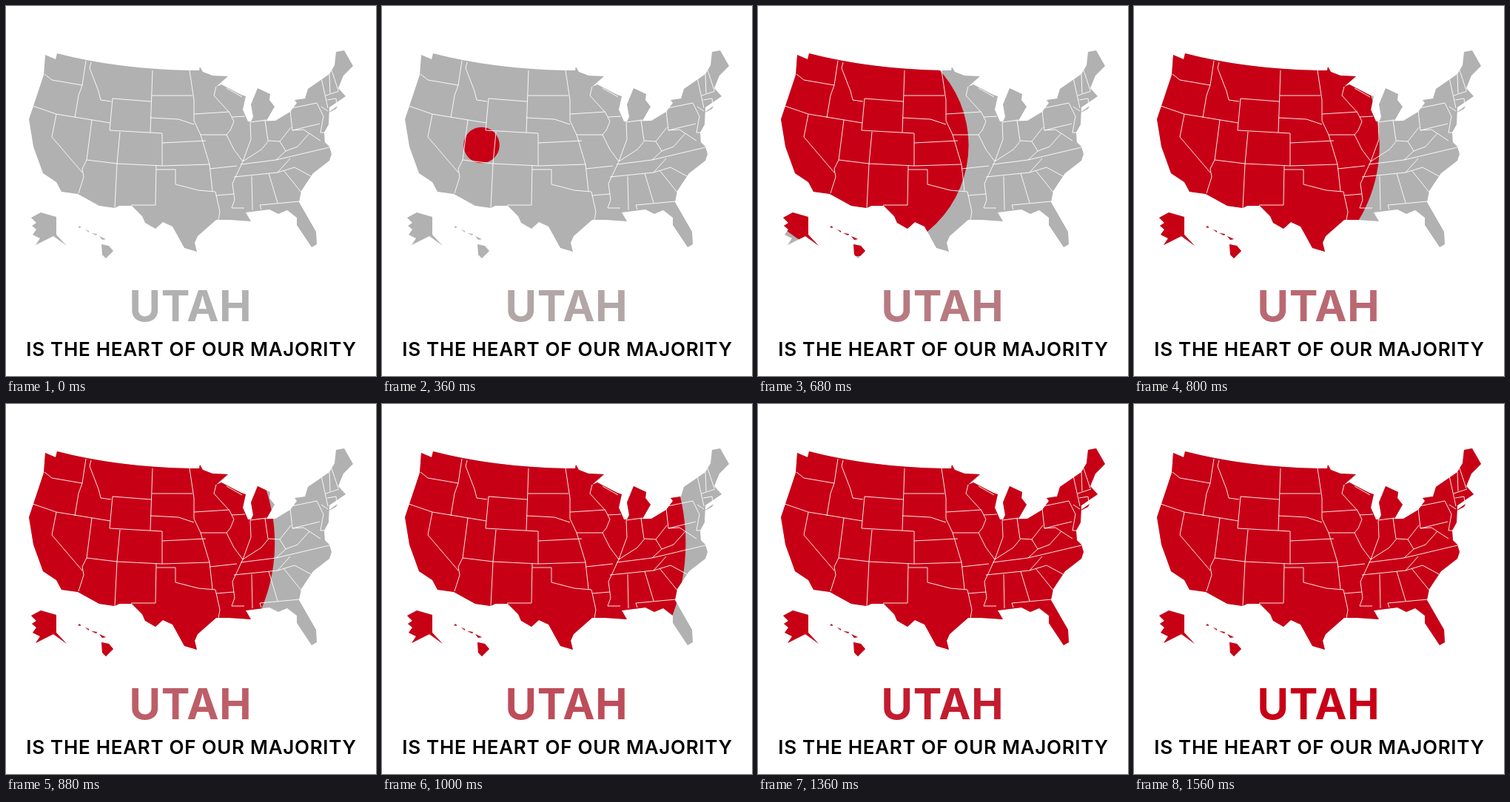
Animation, 500 px wide and 500 px high, one loop 2 s. Source, as an HTML page:

```html
<!DOCTYPE html>
<html lang="en">
<head>
<meta charset="utf-8">
<title>Utah is the heart of our majority</title>
<style>
  html, body { margin: 0; width: 100%; height: 100%; overflow: hidden; background: #fff; }
  svg { display: block; width: 100%; height: 100%; }
  text { font-family: Inter, "Open Sans", sans-serif; text-anchor: middle; }
  .state { font-size: 58px; font-weight: 700; letter-spacing: .8px; fill: #b1b1b1; animation: redden 2s infinite; }
  .tagline { font-size: 26px; font-weight: 600; letter-spacing: .7px; }
  .land { fill: #b1b1b1; }
  .wave { fill: #c80016; r: 0; animation: spread 2s infinite; }
  .borders { fill: none; stroke: #fff; stroke-width: .9; stroke-linejoin: round; }
  @keyframes spread {
    0% { r: 0; animation-timing-function: step-end; }
    16% { r: 8.6px; animation-timing-function: steps(22); }
    60%, 100% { r: 354.5px; }
  }
  @keyframes redden {
    0%, 14% { fill: #b1b1b1; animation-timing-function: steps(32); }
    78%, 100% { fill: #c80016; }
  }
</style>
</head>
<body>
<svg viewBox="0 0 500 500">
  <clipPath id="country">
    <!-- West -->
    <path d="M53 66L67 72 69 64Q150 85 248 87H261L262 82 266 89 279 94 300 95 284 109V289L259 311 255 320 258 332
      241 327 225 298 212 292 202 301 188 293 184 284 170 270H153L147 273 126 270 97 254 75 251 68 238 50 226
      37 190 31 153 51 93Z"/>
    <!-- Great Lakes to Chesapeake -->
    <path d="M284 109L291 106 318 120 324 122 320 140 327 156 364 155 384 143 393 131 390 127 404 125 408 112 437 92
      444 80 446 62 457 60 469 81 456 94 449 111 459 122 437 137 436 160 430 171 431 185 427 180 437 190 440 200
      270 215V120Z"/>
    <!-- South-east -->
    <path d="M270 190H437L440 200 437 209 415 226 399 250 396 265 419 305 420 322 413 326 393 296V286L380 276 368 281
      356 275 324 279 331 291 302 289H284L270 250Z"/>
    <!-- Lower Michigan, Long Island -->
    <path d="M331 156L334 150 331 133 340 111 357 119 356 127 363 136 352 155ZM434 145L448 135 446 139Z"/>
    <!-- Alaska -->
    <path d="M34 286L47 279 68 285V309L82 324 64 311 40 323 46 314 36 309 41 302 35 297 41 293Z"/>
    <!-- Hawaii -->
    <path d="M129 322L139 324 145 331 135 341 130 336ZM97 299l3-2 1 3zM107 302l5 2v2zM115 307l8 1-1 2zM126 311l9 4-5 1z"/>
  </clipPath>

  <g clip-path="url(#country)">
    <rect class="land" width="500" height="360"/>
    <circle class="wave" cx="134.5" cy="188"/>
  </g>

  <g class="borders">
    <!-- Pacific -->
    <path d="M52 92L62 100 103 107M108 74L103 107 98 121 93 151M36 135L68 146 141 158M68 146L62 177 103 225
      M116 154L109 208 103 220 105 231 98 253"/>
    <!-- Mountain -->
    <path d="M115 76L113 84 125 115 128 127 142 129M109 208L150 213 211 216M154 170L150 213 147 273
      M196 129L144 125 140 168 211 172V216M198 87L195 171M203 215L202 269H169"/>
    <!-- Plains -->
    <path d="M197 121H252M195 151L233 153 254 160M211 185L270 182M211 216L275 214M203 221H229V241L260 249 283 251
      M248 87L254 127V155L263 174 275 214 279 250M254 146L302 143M263 174H298M275 220L312 216"/>
    <!-- Mississippi -->
    <path d="M283 251L289 278 287 290M284 256L308 254M284 109L281 121 302 144 308 156 303 168 298 174 308 194 320 210
      306 240 309 262 305 273H322"/>
    <!-- Midwest -->
    <path d="M298 111L319 123M305 150L323 149M352 154L330 157 331 180 320 210 345 194 355 182 370 183 385 164
      M350 154L354 182"/>
    <!-- South -->
    <path d="M317 214L365 208 437 191M308 231L367 225 390 218 414 231M367 225L384 206M375 222L400 253M332 230L333 276
      M355 226L367 266M345 275L343 269 397 264M365 208L378 196 370 183M378 196L394 190 410 172"/>
    <!-- North-east -->
    <path d="M384 141L387 168 424 159M386 138L420 131 429 149 425 171H431M426 136L435 142M387 168L402 167 425 182
      M426 97L435 138M437 92L438 118M440 87L449 114M432 121L450 115M434 127L446 125 447 133"/>
  </g>

  <text class="state" x="249.5" y="426">UTAH</text>
  <text class="tagline" x="250.5" y="473">IS THE HEART OF OUR MAJORITY</text>
</svg>
</body>
</html>
```
